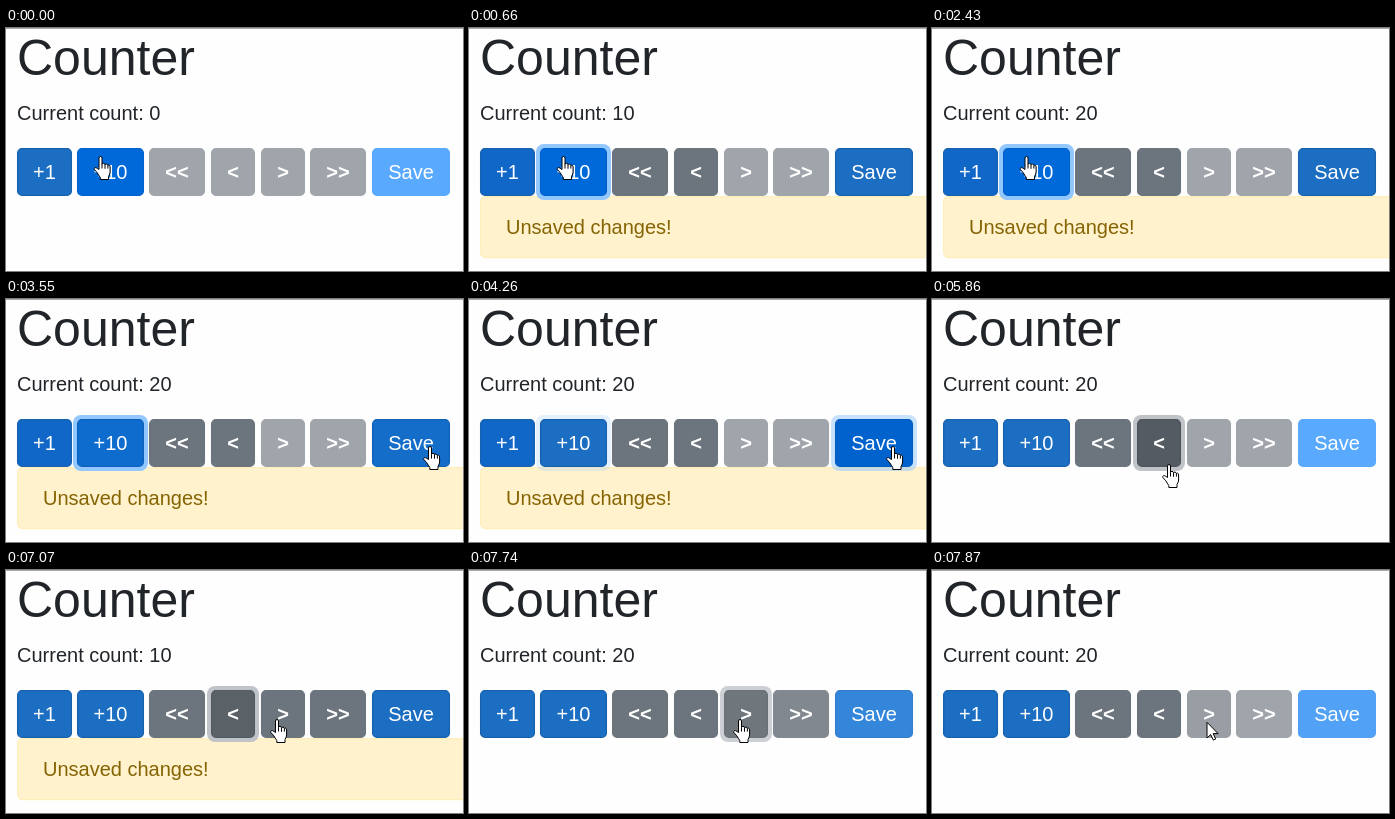
An HTML page that plays this animation: 457x243 px, repeating every 8000 ms.

```html
<!DOCTYPE html>
<html lang="en">
<head>
<meta charset="utf-8">
<title>Counter</title>
<style>
  html, body { margin: 0; width: 100%; height: 100%; overflow: hidden; background: #fefefe; }
  svg { display: block; width: 457px; height: 243px; font-family: Arial, "Liberation Sans", sans-serif; font-size: 20px; }
</style>
</head>
<body>
<svg id="stage" viewBox="0 0 457 243">
  <rect width="457" height="243" fill="#fefefe"/>
  <rect width="457" height="1" fill="#a9a9a9"/>
  <g fill="#212529">
    <text x="11" y="47" font-size="50">Counter</text>
    <text id="count" x="11" y="92"></text>
  </g>
  <g id="alert">
    <rect x="11.6" y="168.6" width="470" height="61" rx="5" fill="#fff2cd" stroke="#ffeeba" stroke-width="1.25"/>
    <text x="37" y="206" fill="#856404">Unsaved changes!</text>
  </g>
  <g id="buttons"></g>
  <g id="hand" fill="#fff" stroke="#000" stroke-linejoin="round">
    <path d="M5.5 13.5V2Q5.5 .5 7 .5Q8.5 .5 8.5 2V8.5Q8.5 7.3 10 7.3Q11.3 7.3 11.5 8.8Q11.7 8 13 8.1Q14.3 8.3 14.4 9.6Q14.8 9 15.6 9.2Q16.6 9.5 16.6 11V16Q16.5 18 15 20.5V23.5H6.8V21.5Q5 19 3.8 16.8L.9 13.5Q.3 12.3 1.4 11.7Q2.6 11.3 3.8 12.4Z"/>
    <path d="M8.5 8.5v4M11.5 8.8v4M14.4 9.6v3" fill="none"/>
  </g>
  <path id="arrow" d="M.5 .8V16.5L4.2 13L6.8 18.6L9.2 17.5L6.7 12.1H11.6Z" fill="#fff" stroke="#000"/>
</svg>
<script>
const LOOP = 8000;
const NS = "http://www.w3.org/2000/svg";
const el = id => document.getElementById(id);

// fill and border of each button look
const looks = {
  blue: ["#1b6ec2", "#1861ac"],
  vivid: ["#1067c8", "#1861ac"],
  blueHover: ["#0069d9", "#0062cc"],
  bluePress: ["#0062cc", "#005cbf"],
  blueDim: ["#59a9ff", "#59a9ff"],
  grey: ["#6c757d", "#6c757d"],
  greyHover: ["#5a6268", "#545b62"],
  greyPress: ["#545b62", "#4e555b"],
  greyDim: ["#a0a5ab", "#a0a5ab"]
};

const channels = hex => [1, 3, 5].map(i => parseInt(hex.slice(i, i + 2), 16));
function mix(a, b, k) {
  const to = channels(b);
  return `rgb(${channels(a).map((v, i) => Math.round(v + (to[i] - v) * k))})`;
}

// a look is "name" or "from>to:amount"
function colours(look) {
  const [from, to, k] = look.split(/[>:]/);
  return [0, 1].map(i => mix(looks[from][i], looks[to || from][i], +k || 0));
}

function add(parent, tag, attrs) {
  const node = document.createElementNS(NS, tag);
  for (const key in attrs) node.setAttribute(key, attrs[key]);
  return parent.appendChild(node);
}

function makeButton(label, x, width, ringColour, weight) {
  const ring = add(el("buttons"), "rect", { x: x - 4, y: 116, width: width + 8, height: 56, rx: 8, fill: ringColour });
  const face = add(el("buttons"), "rect", { x: x + .6, y: 120.6, width: width - 1.2, height: 46.8, rx: 4.4, "stroke-width": 1.25 });
  const text = add(el("buttons"), "text", { x: x + width / 2, y: 151, fill: "#fff", "text-anchor": "middle", "font-weight": weight });
  text.textContent = label;
  return { ring, face };
}

const BLUE_RING = "#93c7ff", GREY_RING = "#c0c4c8";
const buttons = {
  one: makeButton("+1", 11, 55, BLUE_RING, 400),
  ten: makeButton("+10", 71, 67, BLUE_RING, 400),
  first: makeButton("<<", 143, 56, GREY_RING, 700),
  back: makeButton("<", 205, 44, GREY_RING, 700),
  next: makeButton(">", 255, 44, GREY_RING, 700),
  last: makeButton(">>", 304, 56, GREY_RING, 700),
  save: makeButton("Save", 366, 78, BLUE_RING, 400)
};

// each step changes only what it names
const steps = [
  [0, { count: 0, alert: false, cursor: ["hand", 87.5, 128], ring: {},
        one: "blue", ten: "blueHover", first: "greyDim", back: "greyDim",
        next: "greyDim", last: "greyDim", save: "blueDim" }],
  [270, { ten: "bluePress", ring: { ten: .6 } }],
  [420, { count: 10, alert: true, ring: { ten: 1 }, one: "vivid", ten: "blueHover",
          first: "greyDim>grey:.5", back: "greyDim>grey:.5", save: "blueDim>blue:.5" }],
  [540, { first: "grey", back: "grey", save: "blueDim>blue:.9" }],
  [660, { save: "blue" }],
  [2430, { count: 20 }],
  [3400, { cursor: ["arrow", 279, 118] }],
  [3550, { cursor: ["hand", 417, 147], ten: "blueHover>blue:.5", save: "blue>blueHover:.3" }],
  [3680, { ten: "blue", save: "blue>blueHover:.8" }],
  [3810, { save: "blueHover" }],
  [4260, { save: "bluePress", ring: { ten: .25, save: .5 } }],
  [4410, { alert: false, one: "blue", save: "blueHover>blueDim:.6", ring: { save: .6 } }],
  [4550, { save: "blueDim", ring: {}, cursor: ["arrow", 421, 147] }],
  [5060, { cursor: ["arrow", 420.5, 147] }],
  [5220, { cursor: ["arrow", 251, 170] }],
  [5360, { cursor: ["hand", 232, 166], back: "grey>greyHover:.4" }],
  [5480, { cursor: ["hand", 230, 165], back: "grey>greyHover:.9" }],
  [5610, { back: "greyHover" }],
  [5860, { back: "greyPress", ring: { back: 1 } }],
  [6020, { count: 10, alert: true, back: "greyHover", next: "grey", last: "grey", save: "blueDim>blue:.95" }],
  [6160, { save: "blue" }],
  [7070, { cursor: ["hand", 264, 149] }],
  [7210, { back: "grey", next: "greyHover" }],
  [7500, { next: "greyPress", ring: { back: .4, next: .6 } }],
  [7620, { count: 20, alert: false, ring: { next: .8 }, next: "greyHover>greyDim:.3",
           last: "grey>greyDim:.4", save: "blue>blueDim:.4" }],
  [7750, { ring: { next: .3 }, next: "greyHover>greyDim:.7", last: "grey>greyDim:.9",
           save: "blue>blueDim:.7", cursor: ["arrow", 274.5, 151.5] }],
  [7870, { ring: {}, next: "greyHover>greyDim:.9", last: "greyDim", save: "blue>blueDim:.87" }]
];

function draw(time) {
  const state = Object.assign({}, ...steps.filter(s => s[0] <= time).map(s => s[1]));
  el("count").textContent = "Current count: " + state.count;
  el("alert").setAttribute("visibility", state.alert ? "visible" : "hidden");
  for (const name in buttons) {
    const { ring, face } = buttons[name];
    const [fill, border] = colours(state[name]);
    face.setAttribute("fill", fill);
    face.setAttribute("stroke", border);
    ring.setAttribute("opacity", state.ring[name] || 0);
  }
  const [kind, x, y] = state.cursor;
  for (const id of ["hand", "arrow"]) {
    el(id).setAttribute("visibility", id === kind ? "visible" : "hidden");
    el(id).setAttribute("transform", `translate(${x} ${y})`);
  }
}

const start = performance.now();
function tick() {
  draw((performance.now() - start) % LOOP);
  requestAnimationFrame(tick);
}
tick();
</script>
</body>
</html>
```
